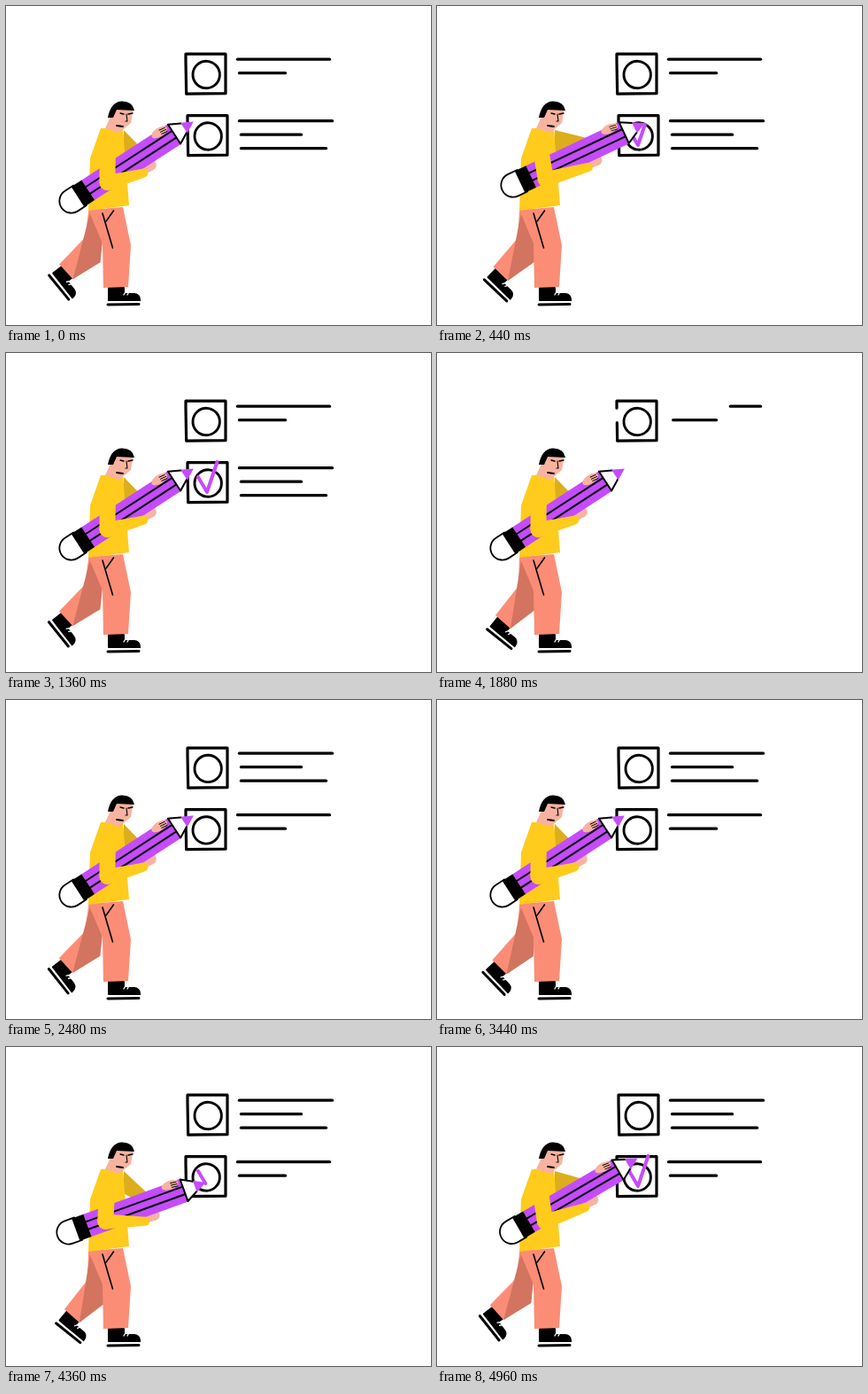
An HTML page with a canvas that plays this animation: 480x360 px, repeating every 5 s.

```html
<!DOCTYPE html>
<html lang="en">
<head>
<meta charset="utf-8">
<title>Checklist</title>
<style>
html, body { margin: 0; width: 100%; height: 100%; overflow: hidden; background: #fff; }
canvas { display: block; width: 480px; height: 360px; }
</style>
</head>
<body>
<canvas id="stage" width="480" height="360"></canvas>
<script>
const ctx = document.getElementById('stage').getContext('2d');
const LOOP = 5000, SECOND_CHECK = 4100, SWAP = 2260, ROW = 69.5;
const INK = '#000', PURPLE = '#c44cfa', YELLOW = '#ffcb1c', YELLOW_DARK = '#dcae1c';
const SALMON = '#fb8d76', SALMON_DARK = '#d2745f', SKIN = '#f8b3a0';

const clamp = v => Math.max(0, Math.min(1, v));
const mix = (a, b, k) => a + (b - a) * k;
const mixAll = (a, b, k) => a.map((v, i) => mix(v, b[i], k));
const progress = (t, from, to) => clamp((t - from) / (to - from));
const ease = (t, from, to) => {
  const k = progress(t, from, to);
  return k * k * (3 - 2 * k);
};

function trace(points) {
  ctx.beginPath();
  points.forEach(([x, y]) => ctx.lineTo(x, y));
}

function fill(color, ...points) {
  trace(points);
  ctx.fillStyle = color;
  ctx.fill();
}

function stroke(color, width, ...points) {
  trace(points);
  ctx.strokeStyle = color;
  ctx.lineWidth = width;
  ctx.stroke();
}

function oval(color, x, y, rx, ry) {
  ctx.beginPath();
  ctx.ellipse(x, y, rx, ry, 0, 0, 2 * Math.PI);
  ctx.fillStyle = color;
  ctx.fill();
}

// Tapered limb with round ends.
function limb(color, a, ra, b, rb) {
  const turn = Math.atan2(b[1] - a[1], b[0] - a[0]) + Math.PI / 2;
  const side = ([x, y], r) => [x + r * Math.cos(turn), y + r * Math.sin(turn)];
  fill(color, side(a, ra), side(b, rb), side(b, -rb), side(a, -ra));
  oval(color, ...a, ra, ra);
  oval(color, ...b, rb, rb);
}

function group(x, y, angle, draw) {
  ctx.save();
  ctx.translate(x, y);
  ctx.rotate(angle);
  draw();
  ctx.restore();
}

// Shows the part of a path between two fractions of its length.
function trimmed(length, from, to, draw) {
  if (to <= from) return;
  ctx.save();
  if (from > 0 || to < 1) {
    ctx.setLineDash([(to - from) * length, length * 2]);
    ctx.lineDashOffset = -from * length;
  }
  draw();
  ctx.restore();
}

const SHORT_ITEM = { x: 203, widths: [104, 52] };
const LONG_ITEM = { x: 205, widths: [105, 68, 96] };
const BOX = 45, RING = 15.2;

function drawItem({ x, widths }, y, sinceErase) {
  group(x, 54.2 + y, 0, () => {
    widths.forEach((width, i) => {
      const p = progress(sinceErase, i * 110, i * 110 + 180);
      if (p === 1) return;
      const left = i ? 60.5 : 58.5, lineY = 6 + i * 15.5, fling = 75 * progress(p, 0.8, 1);
      stroke(INK, 3.3, [left + width * p + fling, lineY], [left + width + fling, lineY]);
    });
    trimmed(4 * BOX, progress(sinceErase, 100, 330), 1, () =>
      stroke(INK, 3.2, [0, 8], [0.7, BOX], [BOX, BOX - 0.5], [BOX, 0], [0, 0], [0, 8]));
    trimmed(2 * Math.PI * RING, progress(sinceErase, 125, 355), 1, () => {
      ctx.beginPath();
      ctx.arc(BOX / 2 + 0.7, BOX / 2 + 0.8, RING, -1.5, 4.8);
      ctx.lineWidth = 2.9;
      ctx.strokeStyle = INK;
      ctx.stroke();
    });
  });
}

function drawCheck(phase, sinceErase) {
  const drawn = 0.35 * progress(phase, 165, 280) + 0.65 * ease(phase, 280, 540);
  trimmed(56, progress(sinceErase, 0, 250), drawn, () =>
    stroke(PURPLE, 4, [217, 140], [227, 157], [238.5, 123]));
}

function drawList(t) {
  if (t < SWAP) {
    drawItem(SHORT_ITEM, 0, t - 1760);
    drawItem(LONG_ITEM, ROW, t - 1440);
    drawCheck(t, t - 1440);
  } else {
    const drop = -50 * Math.exp((2280 - t) / 30);
    drawItem(LONG_ITEM, drop, -1);
    drawItem(SHORT_ITEM, ROW + drop, -1);
    drawCheck(t - SECOND_CHECK, -1);
  }
}

// Tip x, tip y, tilt in degrees.
const REST = [211, 131, -33], VALLEY = [225, 154, -19.5], PEAK = [238, 122, -28];

function pencilPose(phase) {
  let pose = mixAll(REST, VALLEY, ease(phase, 100, 280));
  pose = mixAll(pose, PEAK, ease(phase, 280, 540));
  const [x, y, tilt] = mixAll(pose, REST, ease(phase, 720, 1020));
  const angle = tilt * Math.PI / 180, c = Math.cos(angle), s = Math.sin(angle);
  return { x, y, angle, at: (u, v) => [x + u * c - v * s, y + u * s + v * c] };
}

function drawPencil({ x, y, angle }) {
  const half = 13.5, cone = -25, body = -141, band = -155;
  group(x, y, angle, () => {
    ctx.beginPath();
    ctx.roundRect(-177, -half, 25, 2 * half, [half, 0, 0, half]);
    ctx.fillStyle = '#fff';
    ctx.fill();
    ctx.strokeStyle = INK;
    ctx.lineWidth = 1.8;
    ctx.stroke();
    ctx.fillStyle = PURPLE;
    ctx.fillRect(body, -half, cone - body, 2 * half);
    for (const v of [-4.5, 4.5]) stroke(INK, 2, [body, v], [cone, v]);
    ctx.fillStyle = INK;
    ctx.fillRect(band, -half, body - band, 2 * half);
    fill('#fff', [cone, -13], [0, 0], [cone, 13]);
    stroke(INK, 2, [-12, -6], [cone, -13], [cone, 13], [-12, 6]);
    fill(PURPLE, [1, 0], [-12, -7], [-12, 7]);
  });
}

// Shoe with the ankle at the origin, toe to the right.
function drawShoe() {
  ctx.beginPath();
  ctx.roundRect(-10, -1, 19, 16, 1);
  ctx.roundRect(0, 6, 27, 9, [0, 7, 0, 0]);
  ctx.fillStyle = INK;
  ctx.fill();
  for (const x of [8, 12]) stroke('#fff', 1.3, [x, 8], [x + 2, 4.5]);
  stroke(INK, 3, [-10, 19], [25, 18.5]);
}

function drawLegs(t) {
  const lift = (1 + Math.cos((t - 90) / 1210 * 2 * Math.PI)) / 2;
  group(108, 235, lift * 0.105, () => {
    ctx.translate(-108, -235);
    group(76.5, 303.5, 0.69 + lift * 0.12, drawShoe);
    fill(SALMON, [93, 231], [92, 263], [66, 296], [83, 311], [110, 289], [112, 235]);
    fill(SALMON_DARK, [95, 234], [83, 311], [112, 289], [112, 250]);
  });
  group(125, 318, 0, drawShoe);
  fill(SALMON, [93, 230], [132, 227], [141, 270], [138, 317], [110, 318], [109, 268]);
  stroke(INK, 1.6, [109, 234], [120.5, 273]);
  stroke(INK, 1.6, [121.5, 231], [113, 243]);
}

function drawHead() {
  fill(SKIN, [123, 114], [144, 115], [141, 132], [128, 143], [112, 138]);
  ctx.beginPath();
  ctx.moveTo(115, 126);
  ctx.quadraticCurveTo(118, 109, 130, 107.5);
  ctx.quadraticCurveTo(143, 107, 145, 118);
  ctx.lineTo(125, 117);
  ctx.lineTo(121, 126);
  ctx.fillStyle = INK;
  ctx.fill();
  stroke(INK, 1.3, [129, 121], [133, 122]);
  stroke(INK, 1.4, [138, 122], [143, 121]);
  stroke(INK, 1.1, [136, 122], [137, 130], [135, 130]);
  stroke(INK, 1.8, [125, 135], [132, 136]);
}

function drawPerson(t) {
  const pencil = pencilPose(t < SWAP ? t : t - SECOND_CHECK);
  const [endX, endY] = pencil.at(-165, 0);
  const elbow = [114 + (endX - 72) * 0.7, 199 + (endY - 220) * 0.2];

  drawLegs(t);
  fill(YELLOW_DARK, [133, 140], pencil.at(-66, -13), pencil.at(-72, 0), [132, 165]);
  fill(YELLOW, [107, 138], [132, 138], [139, 225], [93, 231], [95, 172]);
  drawHead();
  limb(SKIN, pencil.at(-76, 15), 5, pencil.at(-66, 15), 6);
  drawPencil(pencil);

  group(...pencil.at(-38, -11), pencil.angle, () => {
    oval(SKIN, 0, 0, 10, 5);
    for (const v of [-2, 0.5, 3]) stroke(INK, 0.9, [1, v], [8, v + 1]);
  });
  limb(YELLOW, [115, 149], 9, elbow, 9);
  limb(YELLOW, elbow, 8.5, pencil.at(-78, 18), 5);
}

function render(now) {
  ctx.fillStyle = '#fff';
  ctx.fillRect(0, 0, 480, 360);
  ctx.lineCap = ctx.lineJoin = 'round';
  drawList(now % LOOP);
  drawPerson(now % LOOP);
  requestAnimationFrame(render);
}

render(0);
</script>
</body>
</html>
```
